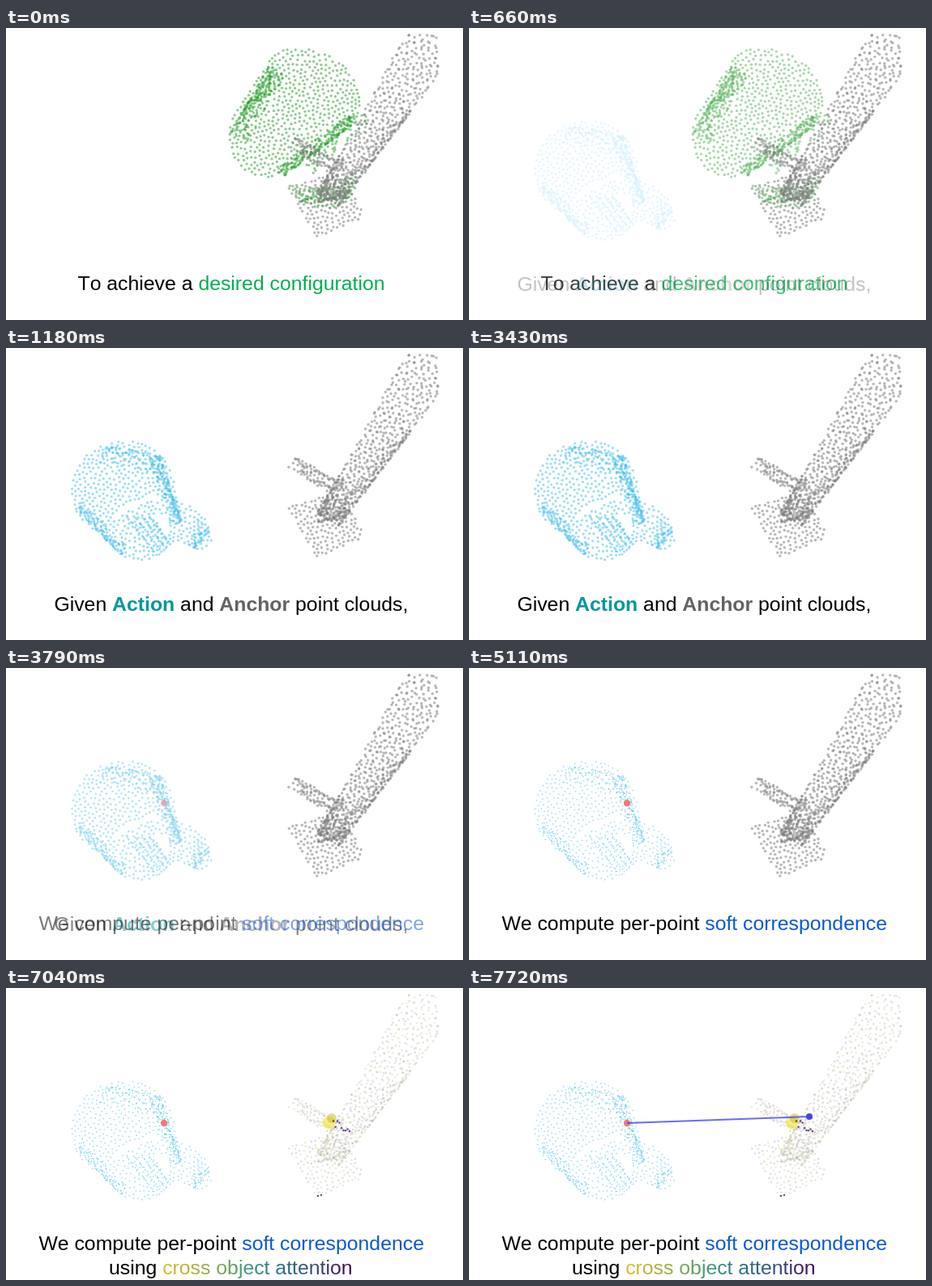
Recreate the animation shown at these times as an HTML page with a canvas. Size 564x361 px, loop 8 s.

```html
<!DOCTYPE html>
<html lang="en">
<head>
<meta charset="utf-8">
<title>Soft correspondence</title>
<style>
html, body { margin: 0; width: 100%; height: 100%; overflow: hidden; background: #fff; }
canvas, svg { position: absolute; left: 0; top: 0; width: 564px; height: 361px; }
text { font: 24.8px "Liberation Sans", Arial, sans-serif; font-kerning: none; white-space: pre; }
.b { font-weight: bold; }
.out1 { animation: out1 8s infinite; }
.mid { animation: mid 8s infinite; }
.in2 { animation: in2 8s infinite; }
.out3 { animation: out3 8s infinite; }
.in3 { animation: in3 8s infinite; }
.in4 { animation: in4 8s infinite; }
@keyframes out1 {
  0%, 6.25% { opacity: 1; animation-timing-function: steps(34); }
  14.75%, 100% { opacity: 0; }
}
@keyframes mid {
  0%, 6.25% { opacity: 0; animation-timing-function: steps(34); }
  14.75%, 42.875% { opacity: 1; animation-timing-function: steps(34); }
  51.375%, 100% { opacity: 0; }
}
@keyframes in2 {
  0%, 42.875% { opacity: 0; animation-timing-function: steps(34); }
  51.375%, 100% { opacity: 1; }
}
@keyframes out3 {
  0%, 63.875% { opacity: 1; animation-timing-function: steps(34); }
  72.375%, 100% { opacity: 0; }
}
@keyframes in3 {
  0%, 63.875% { opacity: 0; animation-timing-function: steps(34); }
  72.375%, 100% { opacity: 1; }
}
@keyframes in4 {
  0%, 88% { opacity: 0; animation-timing-function: steps(34); }
  96.5%, 100% { opacity: 1; }
}
</style>
</head>
<body>
<canvas id="goal" class="out1" width="564" height="361"></canvas>
<canvas id="action" class="mid" width="564" height="361"></canvas>
<canvas id="faint" class="in2" width="564" height="361"></canvas>
<canvas id="anchor" class="out3" width="564" height="361"></canvas>
<canvas id="weights" class="in3" width="564" height="361"></canvas>
<svg viewBox="0 0 564 361">
  <defs>
    <linearGradient id="viridis" gradientUnits="userSpaceOnUse" x1="194" y1="0" x2="428" y2="0">
      <stop offset="0" stop-color="#e3bb28"/>
      <stop offset=".25" stop-color="#94ab48"/>
      <stop offset=".45" stop-color="#3d9a78"/>
      <stop offset=".62" stop-color="#2a728a"/>
      <stop offset=".8" stop-color="#374c82"/>
      <stop offset="1" stop-color="#440154"/>
    </linearGradient>
  </defs>
  <circle class="in2" cx="195" cy="167" r="4.2" fill="#f97676"/>
  <g class="in4">
    <path d="M195 167 420 159" stroke="#4040ff" stroke-width="2.2" stroke-opacity=".78"/>
    <circle cx="420" cy="159" r="4" fill="#4444f4"/>
  </g>
  <text class="out1" x="88.5" y="324">To achieve a <tspan fill="#00b050">desired configuration</tspan></text>
  <text class="mid" x="59.4" y="325">Given <tspan class="b" fill="#0097a0">Action</tspan> and <tspan class="b" fill="#636363">Anchor</tspan> point clouds,</text>
  <text class="in2" x="40.4" y="324">We compute per-point <tspan fill="#0b57d6">soft correspondence</tspan></text>
  <text class="in3" x="127" y="354">using <tspan fill="url(#viridis)">cross object attention</tspan></text>
</svg>
<script>
let seed = 7;
const rnd = () => (seed = seed * 16807 % 2147483647) / 2147483647;
const ctxOf = id => document.getElementById(id).getContext('2d');
const probe = ctxOf('goal');

// Evenly scattered points in an outline; the gap goes from g0 at its top to g1 at its bottom.
function fill(outline, g0, g1 = g0) {
  const path = new Path2D(outline), n = outline.match(/\d+/g).map(Number);
  const xs = n.filter((v, i) => i % 2 == 0), ys = n.filter((v, i) => i % 2);
  const x0 = Math.min(...xs), y0 = Math.min(...ys);
  const w = Math.max(...xs) - x0, h = Math.max(...ys) - y0;
  const pts = [];
  for (let i = w * h * 1.3; i > 0; i--) {
    const x = x0 + rnd() * w, v = rnd(), y = y0 + v * h;
    const gap = (g0 + (g1 - g0) * v) ** 2;
    if (pts.some(p => (p[0] - x) ** 2 + (p[1] - y) ** 2 < gap)) continue;
    if (probe.isPointInPath(path, x, y, 'evenodd')) pts.push([x, y]);
  }
  return pts;
}

// n points along an edge, thinning out over a width to its right (negative: left).
function edge(x0, y0, x1, y1, width, n) {
  const dx = x1 - x0, dy = y1 - y0, len = Math.hypot(dx, dy);
  return Array.from({ length: n }, (_, i) => {
    const t = (i + rnd()) / n, s = width * rnd() ** 1.8 / len;
    return [x0 + dx * t - dy * s, y0 + dy * t + dx * s];
  });
}

function draw(id, pts, r, ...colors) {
  const c = ctxOf(id);
  pts.forEach(([x, y], i) => {
    c.fillStyle = colors[i % colors.length];
    c.beginPath();
    c.arc(x, y, r, 0, 7);
    c.fill();
  });
}

const goal = [
  ...fill('M279 112 L318 52 Q330 24 362 25 Q432 32 437 96 Q434 124 400 130 L340 178 Q318 194 292 174 Q268 156 279 112Z', 4.7),
  ...edge(277, 130, 325, 46, 24, 130),
  ...edge(292, 102, 328, 52, 14, 60),
  ...edge(343, 183, 432, 116, -13, 150),
  ...edge(365, 165, 435, 100, 22, 70),
  ...edge(335, 180, 363, 157, 1, 12),
  ...fill('M350 195 Q390 204 433 178 Q434 222 392 223 Q360 220 350 195Z', 4.2),
  ...edge(362, 215, 425, 210, -14, 50)
];

const action = [
  ...fill('M81 182 Q82 118 150 115 Q194 118 207 163 L217 213 190 204 180 206 204 240 Q185 272 144 257 L95 214 Q82 198 81 182Z M128 208 Q150 190 186 178 L190 186 Q160 194 138 211Z', 4.7),
  ...edge(86, 198, 142, 256, -12, 90),
  ...edge(190, 133, 217, 215, 14, 150),
  ...edge(120, 120, 192, 133, 22, 70),
  ...fill('M210 190 Q250 198 254 236 Q246 260 218 240 L198 238Z', 4.6),
  ...edge(233, 249, 252, 224, -18, 40)
];
for (let i = 0; i < 4; i++)
  action.push(...edge(150 + 9 * i, 208, 188 + 5 * i, 258 - 5 * i, 1, 14));

const anchor = [
  ...fill('M497 8 L533 9 533 60 412 220 383 205 430 125 478 35Z', 5.8, 4.2),
  ...fill('M497 8 L533 9 533 60 412 220 383 205 430 125 478 35Z', 9.5, 5.5),
  ...edge(500, 104, 410, 219, 15, 110),
  ...edge(412, 160, 383, 206, -14, 55),
  ...fill('M348 148 L358 134 410 165 400 180Z', 4.8),
  ...edge(357, 136, 409, 165, 6, 24),
  ...edge(363, 151, 404, 173, 5, 20),
  ...fill('M348 197 L380 188 400 178 425 200 443 233 384 259Z', 4.5),
  ...edge(385, 216, 425, 206, -26, 55)
];

draw('goal', goal, 1.65, 'rgba(40,160,44,.52)');
draw('action', action, 1.6, 'rgba(70,192,238,.52)');
draw('faint', action, .85, 'rgba(70,195,235,.58)');
draw('anchor', anchor, 1.7, 'rgba(124,124,124,.54)');
draw('weights', anchor, 1.3, 'rgba(160,160,150,.3)', 'rgba(205,195,110,.3)', 'rgba(150,140,165,.3)', 'rgba(160,185,150,.27)');

draw('weights', [[398.5, 166.5]], 7.8, 'rgba(240,224,50,.62)');
draw('weights', [[402, 161]], 6, 'rgba(205,196,60,.6)');
const specks = Array.from({ length: 9 }, (_, i) => [404 + 2.5 * i, 162 + i + rnd() * 9]);
draw('weights', [...specks, [385, 257], [389, 256]], 1.25, 'rgba(75,15,110,.75)');
</script>
</body>
</html>
```
